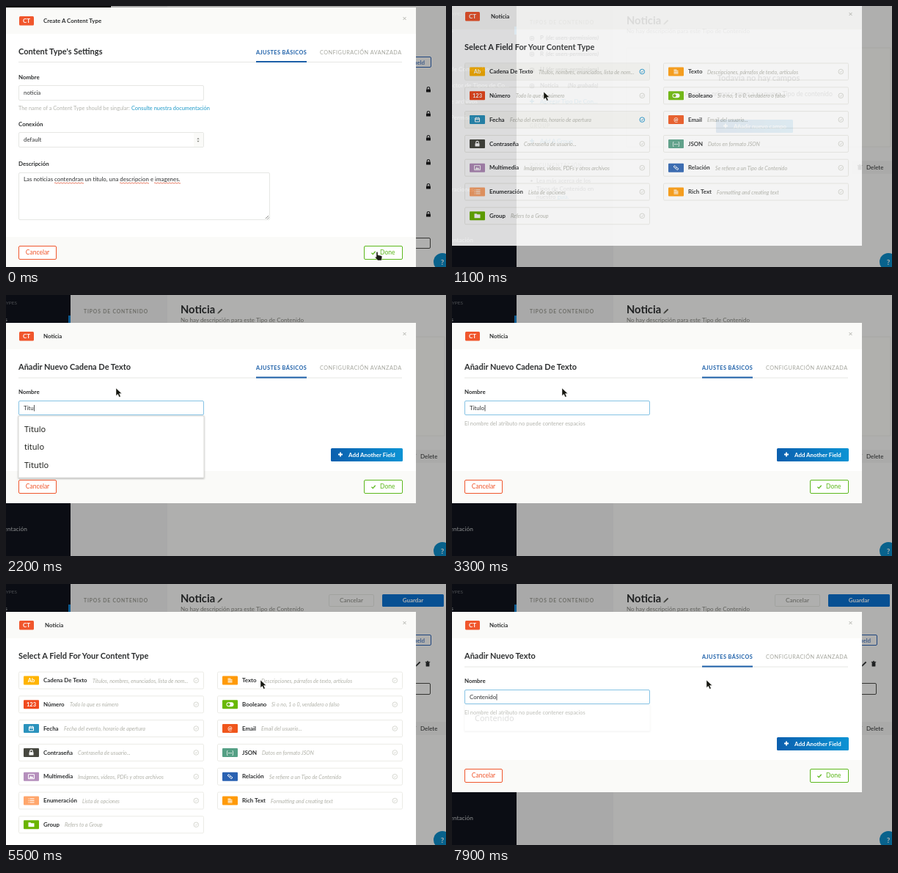
Write an HTML page that moves like this. It is 600 px wide and 356 px high and loops after 8000 ms.

```html
<!DOCTYPE html>
<html lang="es">
<head>
<meta charset="utf-8">
<title>Content type builder</title>
<style>
  html, body { margin: 0; width: 100%; height: 100%; overflow: hidden; background: #afafaf; }
  svg { display: block; width: 600px; height: 356px; font-family: Lato, sans-serif; }
  text { white-space: pre; }
  .menu { font-family: "Noto Sans", sans-serif; }
</style>
</head>
<body>
<svg id="stage" viewBox="0 0 600 356"></svg>
<script>
const LOOP = 8000;
const INK = '#2d2f30', PALE = '#b3b4ad', BLUE = '#1c5fa8', GREEN = '#5cb81c', RED = '#f0562c';
const SOFT = '#fafaf8', RULE = '#e6e7e4';

// ---- drawing helpers ----
const text = (x, y, str, size = 7.9, fill = INK, extra = '') =>
  `<text x="${x}" y="${y}" font-size="${size}" fill="${fill}" ${extra}>${str}</text>`;
const bold = (x, y, str, size = 7.9, fill = INK, extra = '') =>
  text(x, y, str, size, fill, 'font-weight="700" ' + extra);
const rect = (x, y, w, h, fill, extra = '') =>
  `<rect x="${x}" y="${y}" width="${w}" height="${h}" fill="${fill}" ${extra}/>`;
const box = (x, y, w, h, stroke, fill = 'none', r = 1.5) =>
  rect(x + .5, y + .5, w - 1, h - 1, fill, `stroke="${stroke}" rx="${r}"`);
const line = (d, stroke, w = 1, extra = '') =>
  `<path d="${d}" fill="none" stroke="${stroke}" stroke-width="${w}" ${extra}/>`;
const at = (x, y, body) => `<g transform="translate(${x} ${y})">${body}</g>`;
const group = (id, body) => `<g id="${id}">${body}</g>`;
const plus = (x, y, color, w = 1.5) => line(`M${x - 3} ${y}h6M${x} ${y - 3}v6`, color, w);
const lock = (x, y, color = '#1c1d1e') => at(x, y,
  rect(-3, -.6, 6, 4.2, color, 'rx=".6"') + line('M-1.8-.5v-1.2a1.8 1.8 0 0 1 3.6 0v1.2', color, 1.1));
const trash = (x, y) => at(x, y,
  rect(-2.4, -2, 4.8, 5.6, INK, 'rx=".6"') + line('M-3.2-2.6h6.4M-1-3.6h2', INK, 1));
const pencil = (x, y, color = INK) => at(x, y,
  line('M-2.2 2.2L2.6-2.6', color, 1.8) + `<path d="M-3.6 3.6l.5-2.2 1.7 1.7z" fill="${color}"/>`);
const heading = (x, y, str) => bold(x, y, str, 6.7, '#9b9c94', 'letter-spacing=".9"');

// ---- page behind the dialogs ----
function sidebar() {
  const items = [[15, 13, 'CONTENT TYPES', 6.5, '#6d7076'], [2, 36, 'Users'],
    [51, 89, 'Tipos de Contenidos'], [78, 111, 'Constructor de Tipos de Co...'],
    [35, 133, 'Carga de archivos'], [31, 155, 'Roles y Permisos'],
    [30, 253, 'Configuraciones'], [29, 322, 'Documentación']];
  return rect(0, 0, 88, 356, '#10131c') +
    items.map(([x, y, s, size = 8.4, c = '#c6c9cc']) => text(x, y, s, size, c, 'text-anchor="end"')).join('') +
    rect(85, 28, 3, 11, '#1684d0');
}

function typeList() {
  const users = ['P', 'R', 'U'].map((s, i) => {
    const y = 46 + i * 21.7;
    return bold(120, y, s) + text(128, y, '(de: users-permissions)', 7.6, INK, 'font-style="italic" font-weight="700"');
  }).join('');
  const icons = [0, 1, 2, 3].map(i => {
    const y = 41 + i * 21.7;
    return box(106, y, 6, 6, INK, 'none', 1) + rect(108, y + 2, 2, 2, INK);
  }).join('');
  return rect(88, 0, 132, 356, '#f1f1f1') + heading(106, 25, 'TIPOS DE CONTENIDO') + users + icons +
    bold(120, 111, 'Noticia') + text(158, 111, '(No grabado)', 7.6, INK, 'font-style="italic" font-weight="700"') +
    plus(109, 130, '#1b8fc4') + text(120, 132.6, 'Agregar Tipo De Con...', 7.95, '#1b8fc4') +
    heading(106, 165.5, 'GROUP') +
    plus(109, 184, '#1b8fc4') + text(120, 186.6, 'Add A Group', 7.95, '#1b8fc4') +
    heading(106, 219.5, 'DOCUMENTACIÓN') +
    `<circle cx="108.5" cy="238.5" r="1.3" fill="${INK}"/>` +
    text(115, 241, 'Lea más acerca de los') + text(115, 252, 'Tipos de Contenido en') +
    text(115, 263, 'nuestro <tspan fill="#1b8fc4">guía.</tspan>');
}

const pageTitle = () => bold(238, 25, 'Noticia', 14.7) + pencil(292, 22, '#54564f') +
  text(238, 36.7, 'No hay descripción para este Tipo de Contenido', 8, '#85867f');

const deleteButton = y => rect(545, y - 9, 60, 18, '#f3f3f1') + trash(556, y) + text(565, y + 3, 'Delete', 8);

const addFieldLink = () => box(500, 69, 80, 15, '#2b62b4') + text(571, 79.5, 'Add another field', 8, '#2b62b4', 'text-anchor="end"');

function oldPage() {
  return rect(0, 0, 143, 2, '#000') + addFieldLink() +
    [114, 147, 180, 213, 246, 284].map(y => lock(576, y)).join('') + box(480, 316, 99, 15, '#4a4b48');
}

function emptyPage() {
  return pageTitle() + rect(238, 57, 360, 135, '#fcfcf8', 'stroke="#efefea"') +
    bold(418, 102, 'Todavía no hay campos', 11, INK, 'text-anchor="middle"') +
    text(418, 123, 'Añada su primer campo a su nuevo Tipo de contenido', 8.6, INK, 'text-anchor="middle"') +
    rect(360, 155, 105, 18, 'url(#blue)', 'rx="1.5"') + plus(373, 163.5, '#fff', 1.8) +
    bold(384, 166.6, 'Añadir nuevo campo', 7.9, '#fff') + deleteButton(220);
}

function filledPage() {
  return pageTitle() + box(440, 14, 62, 17, RULE) +
    text(471, 25.3, 'Cancelar', 8.4, '#85867f', 'text-anchor="middle"') +
    rect(513, 14, 84, 17, '#0a72d2', 'rx="1.5"') +
    bold(555, 25.2, 'Guardar', 7.9, '#fff', 'text-anchor="middle"') +
    addFieldLink() + pencil(562, 109) + trash(575, 109) + box(480, 135, 99, 16, '#4a4b48') + deleteButton(197);
}

const help = '<circle cx="595" cy="349" r="12" fill="#0b8cc8"/>' + bold(595, 352.5, '?', 10, '#fff', 'text-anchor="middle"');

// ---- dialogs ----
function dialog(top, height, title, titleX, body) {
  return rect(-10, top, 569, height, '#fff') + rect(-10, top, 569, 36, SOFT) +
    rect(18, top + 12, 20, 12.5, RED, 'rx="1.5"') +
    bold(28, top + 21.3, 'CT', 8, '#fff', 'text-anchor="middle"') +
    bold(titleX, top + 20.5, title) + line(`M541.5 ${top + 13}l4 4m0-4l-4 4`, '#b5b6b0', 1) + body;
}

function tabs(y) {
  return line(`M17 ${y + 13.5}H540`, RULE) + rect(341, y + 12, 69, 2, BLUE) +
    bold(341, y + 2.6, 'AJUSTES BÁSICOS', 7.3, BLUE, 'letter-spacing=".45"') +
    text(428, y + 2.6, 'CONFIGURACIÓN AVANZADA', 7.3, '#a5a69e', 'letter-spacing=".45"');
}

function footer(y) {
  return rect(-10, y, 569, 44, SOFT) + box(17, y + 12, 52, 19, RED, '#fff') +
    text(43, y + 24.4, 'Cancelar', 8.5, RED, 'text-anchor="middle"') +
    box(488, y + 12, 53, 19, GREEN, '#fff') + line(`M498.5 ${y + 21.8}l1.8 1.8 3.4-3.8`, GREEN, 1.3) +
    text(510, y + 24.4, 'Done', 8.5, GREEN);
}

function squiggle(x, end, y) {
  return line(`M${x} ${y}` + 'q1-1.4 2 0t2 0'.repeat(Math.round((end - x) / 4)), '#e05a3c', .8);
}

function settings() {
  const body = bold(17, 66, "Content Type's Settings", 11) + tabs(63) +
    bold(17, 99.5, 'Nombre') + box(17, 108, 253, 21, RULE, '#fff') + text(24, 121, 'noticia') +
    text(17, 142, 'The name of a Content Type should be singular: ', 7.3, PALE) +
    text(171, 142, 'Consulte nuestra documentación', 7.4, '#1f9ac8') +
    bold(17, 163.5, 'Conexión') + box(17, 172, 253, 21, RULE, '#fff') + rect(256, 173, 13, 19, SOFT) +
    `<path d="M260.3 181.7l1.7-2 1.7 2zM260.3 183.7l1.7 2 1.7-2z" fill="#85867f"/>` + text(24, 185, 'default') +
    bold(17, 218, 'Descripción') + box(17, 227, 343, 65, RULE, '#fff') +
    line('M354 290l4-4M356.5 290.5l2-2', '#6b6c66', .8) +
    text(24, 239, 'Las noticias contendran un titulo, una descripcion e imagenes.') +
    squiggle(66, 105, 241.5) + squiggle(155, 194, 241.5) + squiggle(202, 237, 241.5) + footer(315);
  return dialog(2, 357, 'Create A Content Type', 51, body);
}

const white = d => line(d, '#fff', 1);
const word = (s, size = 7.5) => bold(0, 2.7, s, size, '#fff', 'text-anchor="middle"');
const glyphs = {
  ab: word('Ab'), num: word('123'), mail: word('@'), json: word('{···}', 6.5),
  lines: white('M-3-2.5h4M-3-.8h6M-3 .9h6M-3 2.6h6'),
  cal: white('M-3-2.2h6v5h-6zM-1.5-3.6v2M1.5-3.6v2M-3-.4h6'),
  lock: lock(0, 0, '#fff'),
  pic: white('M-4-3h8v6h-8z') + '<path d="M-3 2l2-3 1.5 1.6 1-1L3 2z" fill="#fff"/>',
  list: white('M-4-2.5h1M-2-2.5h6M-4 0h1M-2 0h6M-4 2.5h1M-2 2.5h6'),
  dir: '<path d="M-4-3h3l1 1h4v5h-8z" fill="#fff"/>',
  toggle: '<rect x="-5" y="-3" width="10" height="6" rx="3" fill="#fff"/><circle cx="-2" r="2" fill="#68b800"/>',
  link: white('M-3.5-1.5l2-1.5 2 2-1.5 1.5zM3.5 1.5l-2 1.5-2-2L1-.5z')
};
// label, description, description x, icon colour, glyph, hover id
const kinds = [
  [['Cadena De Texto', 'Títulos, nombres, enunciados, lista de nom...', 118, '#ffb400', 'ab', 'hotString'],
   ['Número', 'Todo lo que es número', 87, '#f04a1e', 'num'],
   ['Fecha', 'Fecha del evento, horario de apertura', 79, '#2b93bd', 'cal', 'hotDate'],
   ['Contraseña', 'Contraseña de usuario...', 98, '#46473f', 'lock'],
   ['Multimedia', 'Imágenes, videos, PDFs y otros archivos', 98, '#b58fbc', 'pic'],
   ['Enumeración', 'Lista de opciones', 104, '#ffa66c', 'list'],
   ['Group', 'Refers to a Group', 80, '#6bb400', 'dir']],
  [['Texto', 'Descripciones, párrafos de texto, artículos', 348, '#ff9a08', 'lines', 'hotText'],
   ['Booleano', 'Si o no, 1 o 0, verdadero o falso', 362, '#68b800', 'toggle'],
   ['Email', 'Email del usuario...', 348, '#f0561c', 'mail'],
   ['JSON', 'Datos en formato JSON', 349, '#55a085', 'json'],
   ['Relación', 'Se refiere a un Tipo de Contenido', 359, '#2a62b2', 'link'],
   ['Rich Text', 'Formatting and creating text', 361, '#ff9a08', 'lines']]
];
const tick = (x, y, c) => `<circle cx="${x}" cy="${y}" r="3.3" fill="none" stroke="${c}"/>` +
  line(`M${x - 1.5} ${y}l1.2 1.2 2-2.3`, c, .9);

function picker() {
  const rows = kinds.map((col, c) => col.map(([label, desc, dx, color, icon, hover], i) => {
    const x = c ? 288 : 17, y = 131.5 + i * 32.8;
    return box(x, y - 12, 253, 24, '#ebebe6') + tick(x + 242.3, y, '#d6d7d0') +
      (hover ? group(hover, rect(x + 1, y - 11, 251, 22, '#f8f8f5') + tick(x + 242.3, y, '#1c94cc')) : '') +
      rect(x + 7, y - 6, 21, 12, color, 'rx="1"') + at(x + 17.5, y, glyphs[icon]) +
      bold(x + 34, y + 2.7, label) + text(dx, y + 3, desc, 7.2, '#b0b1a8', 'font-style="italic"');
  }).join('')).join('');
  return dialog(38, 331, 'Noticia', 53, bold(17, 102, 'Select A Field For Your Content Type', 11) + rows);
}

function fieldForm(id, title, typed, full, options, menuX) {
  const entry = (key, str, caret) => group(id + key, text(24, 156.6, str) + line(`M${caret} 150v8.5`, INK, .8));
  const height = options.length * 24.4 + 11;
  const menu = group(id + 'Menu', rect(17, 165, 253, height, '#fff', 'stroke="#cfcfcb" stroke-width=".8" filter="url(#drop)"') +
    options.map((s, i) => text(menuX, 187 + i * 24.4, s, 11, '#22231f', 'class="menu" font-weight="500"')).join(''));
  const body = bold(17, 102, title, 11) + tabs(99.5) + bold(17, 135, 'Nombre') +
    box(17, 144, 253, 20, '#86c3e4', '#fff') + entry('Part', ...typed) + entry('Full', ...full) +
    text(17, 177.7, 'El nombre del atributo no puede contener espacios', 7.4, PALE) +
    rect(443, 209, 98, 18, 'url(#blue)', 'rx="1.5"') + plus(456, 217.5, '#fff', 1.8) +
    bold(467, 220.7, 'Add Another Field', 7.9, '#fff') + footer(240) + menu;
  return dialog(38, 246, 'Noticia', 51, body);
}

const arrow = '<path d="M0 0v10.5l2.5-2.2 1.8 4 2-.9-1.8-3.9h3.4z" fill="#15160f" stroke="#fff" stroke-width=".5"/>';
const hand = '<path d="M0 1q1-1.6 2 0v3.6l5 1.2q1 .4.8 1.8l-.8 4.4h-5L-1.6 8q-.4-1.6 1.6-.6z" fill="#1c1d14" stroke="#fff" stroke-width=".4"/>';

stage.innerHTML = `<defs>
  <linearGradient id="blue"><stop stop-color="#0b5fae"/><stop offset="1" stop-color="#0c93d4"/></linearGradient>
  <filter id="drop"><feDropShadow dx="0" dy="1" stdDeviation="1.2" flood-opacity=".3"/></filter></defs>` +
  rect(0, 0, 600, 356, '#fafaf9') + sidebar() + typeList() +
  group('old', oldPage()) + group('empty', emptyPage()) + group('filled', filledPage()) + help +
  rect(0, 0, 600, 356, '#000', 'id="shade"') +
  group('settings', settings()) + group('picker', picker()) +
  group('title', fieldForm('t', 'Añadir Nuevo Cadena De Texto', ['Titu', 38.5], ['Titulo', 45], ['Titulo', 'titulo', 'Titutlo'], 25)) +
  group('content', fieldForm('c', 'Añadir Nuevo Texto', ['Cont', 41], ['Contenido', 61], ['Contenido'], 31)) +
  group('hand', hand) + group('arrow', arrow);

// ---- motion: every step holds until the next ----
function track(id, steps) {
  const frames = steps.map(([t, props]) => ({ offset: t / LOOP, easing: 'steps(1, end)', ...props }));
  frames.push({ ...frames[frames.length - 1], offset: 1 });
  document.getElementById(id).animate(frames, { duration: LOOP, iterations: Infinity });
}
const fade = (id, ...steps) => track(id, steps.map(([t, opacity]) => [t, { opacity }]));
const slide = (id, ...steps) => track(id, steps.map(([t, x, y]) => [t, { transform: `translate(${x}px, ${y}px)` }]));

fade('old', [0, 1], [500, 0]);
fade('empty', [0, 0], [500, 1], [4000, 0]);
fade('filled', [0, 0], [4000, 1]);
fade('shade', [0, .3], [700, .27], [800, .24], [900, .21], [1000, .25], [1100, .3]);

fade('settings', [0, 1], [500, .97], [600, .88], [700, .65], [800, .35], [900, .07], [1000, 0]);
slide('settings', [0, 0, 0], [500, 0, -3], [600, 0, -10], [700, 0, -25], [800, 0, -42], [900, 0, -56]);

fade('picker', [0, 0], [1000, .4], [1100, .86], [1200, 1], [2200, 0], [4000, 1], [6500, 0]);
slide('picker', [0, 0, -62], [1100, 0, -42], [1200, 0, -14], [1300, 0, 0]);
fade('hotString', [0, 1], [4800, 0]);
fade('hotDate', [0, 1], [1200, 0]);
fade('hotText', [0, 0], [4900, 1], [5100, 0]);

fade('title', [0, 0], [2200, 1], [4000, 0]);
fade('tPart', [0, 1], [3300, 0]);
fade('tFull', [0, 0], [3300, 1]);
fade('tMenu', [0, 1], [3300, 0]);

fade('content', [0, 0], [6500, 1]);
fade('cPart', [0, 1], [7700, 0]);
fade('cFull', [0, 0], [7700, 1]);
fade('cMenu', [0, 1], [7700, .65], [7800, .35], [7900, .15]);

fade('hand', [0, 1], [1000, 0]);
slide('hand', [0, 505, 335], [500, 470, 290], [600, 412, 165], [700, 300, 140], [800, 180, 122], [900, 105, 113]);
fade('arrow', [0, 0], [1000, 1]);
slide('arrow', [0, 112, 115], [1100, 125, 117], [1200, 142, 124], [1300, 150, 127],
  [4600, 163, 136], [4800, 285, 137], [4900, 347, 131]);
</script>
</body>
</html>
```
